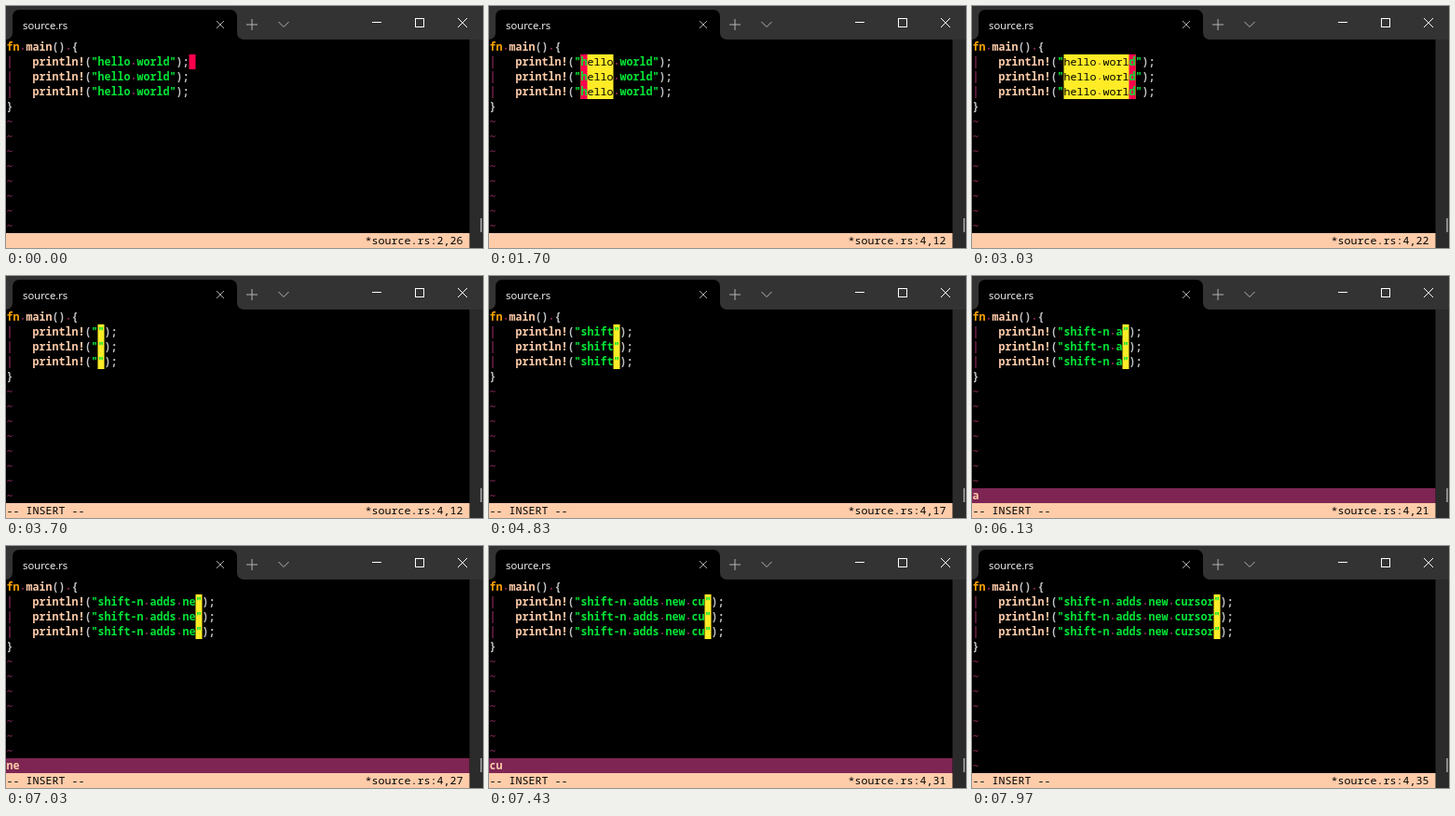
Write an HTML page with a canvas that moves like this. It is 512x260 px and loops after 8 s.

```html
<!DOCTYPE html>
<html lang="en">
<head>
<meta charset="utf-8">
<title>Multiple cursors</title>
<style>
  html, body { margin: 0; width: 100%; height: 100%; overflow: hidden; background: #000; }
  canvas { display: block; width: 512px; height: 260px; }
</style>
</head>
<body>
<canvas id="stage" width="512" height="260"></canvas>
<script>
const ctx = document.getElementById('stage').getContext('2d');
const LOOP = 8000, CELL = 7, LINE = 16, LEFT = 0.5, TOP = 36, WIDTH = 497.5;
const MONO = '11.67px "Noto Sans Mono", "DejaVu Sans Mono", monospace';
const SANS = '500 11.3px "Open Sans", "Noto Sans", sans-serif';
const C = {
  bar: '#333333', side: '#2b2b2b', black: '#000000', purple: '#7e2553', red: '#ff004d',
  orange: '#ffa300', yellow: '#ffec27', green: '#00e436', gray: '#c2c3c7', peach: '#ffccaa'
};

const OLD = 'hello world', NEW = 'shift-n adds new cursor';
const QUOTE = 13, FIRST = QUOTE + 1;   // columns of the opening quote and of the text
const SELECT = 3000, INSERT = 3570;

// Typing pace: time and number of letters, even in between
const PACE = [[4230, 1], [4800, 5], [5430, 8], [6000, 9], [6950, 15], [7900, 23]];

function typed(t) {
  if (t < PACE[0][0]) return 0;
  const i = PACE.findIndex(p => p[0] > t);
  if (i < 0) return NEW.length;
  const [t0, n0] = PACE[i - 1], [t1, n1] = PACE[i];
  return Math.floor(n0 + (n1 - n0) * (t - t0) / (t1 - t0));
}

// How many of the given moments have passed
const passed = (t, ...times) => times.filter(m => m <= t).length;

function stateAt(t) {
  if (t < INSERT) {
    const wide = t >= SELECT;
    const ends = [FIRST + OLD.length + 3, FIRST + OLD.indexOf('world'), FIRST];
    return {
      text: OLD, insert: false, hint: '',
      col: wide ? FIRST + OLL_LAST : ends[passed(t, 430, 580)],
      last: 1 + passed(t, 1260, 1430),
      marked: wide ? OLD.length : passed(t, 1130) * 'hello'.length
    };
  }
  const text = NEW.slice(0, typed(t));
  const done = text.endsWith('shift') || text === NEW;
  return {
    text, insert: true, hint: done ? '' : text.match(/[a-z]*$/)[0],
    col: FIRST + text.length, last: 3, marked: 0
  };
}
const OLL_LAST = OLD.length - 1;

function rect(x, y, w, h, color) {
  ctx.fillStyle = color;
  ctx.fillRect(x, y, w, h);
}

function lines(color, width, ...paths) {
  ctx.strokeStyle = color;
  ctx.lineWidth = width;
  ctx.beginPath();
  for (const [x, y, ...rest] of paths) {
    ctx.moveTo(x, y);
    for (let i = 0; i < rest.length; i += 2) ctx.lineTo(rest[i], rest[i + 1]);
  }
  ctx.stroke();
}

function cross(x, y, r, color) {
  lines(color, 1, [x - r, y - r, x + r, y + r], [x + r, y - r, x - r, y + r]);
}

// Writes text on the character grid; spaces show as dots when asked
function put(row, col, text, color, dots = false) {
  ctx.font = color === C.black ? MONO : '600 ' + MONO;
  [...text].forEach((ch, i) => {
    const blank = dots && ch === ' ';
    ctx.fillStyle = blank ? C.purple : color;
    ctx.fillText(blank ? '.' : ch, LEFT + (col + i) * CELL, TOP + row * LINE + (blank ? 11 : 12));
  });
}

function cells(row, col, count, color) {
  rect(LEFT + col * CELL, TOP + row * LINE, count * CELL, LINE, color);
}

function drawTab(x0, x1, top, r) {
  ctx.fillStyle = C.black;
  ctx.beginPath();
  ctx.moveTo(x0 - r, TOP);
  ctx.arcTo(x0, TOP, x0, top, r);
  ctx.arcTo(x0, top, x1, top, r);
  ctx.arcTo(x1, top, x1, TOP, r);
  ctx.arcTo(x1, TOP, x1 + r, TOP, r);
  ctx.lineTo(x1 + r, TOP);
  ctx.fill();
}

function drawWindow() {
  rect(0, 0, 512, TOP, C.bar);
  rect(WIDTH, TOP, 512 - WIDTH, 260 - TOP, C.side);
  rect(509, 228, 2, 15, '#8c8c8c');
  drawTab(7, 248, 4, 7);

  ctx.font = SANS;
  ctx.fillStyle = '#ffffff';
  ctx.fillText('source.rs', 18, 25);

  cross(230, 20, 4, '#a6a6a6');
  lines('#b4b4b4', 1, [258, 20, 270, 20], [264, 14, 264, 26], [292.5, 17, 298, 22.5, 303.5, 17]);
  lines('#ffffff', 1, [393, 17.5, 403, 17.5]);
  ctx.strokeRect(439.5, 13.5, 9, 9);
  cross(490, 18, 5, '#ffffff');
}

function drawCodeLine(row, s) {
  put(row, 0, '|', C.purple);
  put(row, 4, 'println!', C.peach);
  put(row, 12, '(', C.gray);
  put(row, QUOTE, '"', C.green);
  put(row, FIRST + s.text.length + 1, ');', C.gray);

  cells(row, FIRST, s.marked, C.yellow);
  const active = row <= s.last;
  if (active) cells(row, s.col, 1, s.insert ? C.yellow : C.red);

  [...s.text + '"'].forEach((ch, i) => {
    const col = FIRST + i;
    const dark = i < s.marked && !(active && col === s.col);
    put(row, col, ch, dark ? C.black : C.green, true);
  });
}

function draw(t) {
  const s = stateAt(t);
  rect(0, 0, 512, 260, C.black);
  drawWindow();

  put(0, 0, 'fn ', C.orange, true);
  put(0, 3, 'main', C.peach);
  put(0, 7, '() {', C.gray, true);
  for (let row = 1; row <= 3; row++) drawCodeLine(row, s);
  put(4, 0, '}', C.gray);
  for (let row = 5; row <= 12; row++) put(row, 0, '~', C.purple);

  if (s.hint) {
    rect(0, TOP + 12 * LINE, WIDTH, LINE, C.purple);
    put(12, 0, s.hint, C.peach);
  }
  rect(0, TOP + 13 * LINE, WIDTH, LINE, C.peach);
  if (s.insert) put(13, 0, '-- INSERT --', C.black);
  put(13, 55, `*source.rs:${s.last + 1},${s.col - 2}`, C.black);
}

const start = performance.now();
function tick() {
  draw((performance.now() - start) % LOOP);
  requestAnimationFrame(tick);
}
tick();
</script>
</body>
</html>
```
